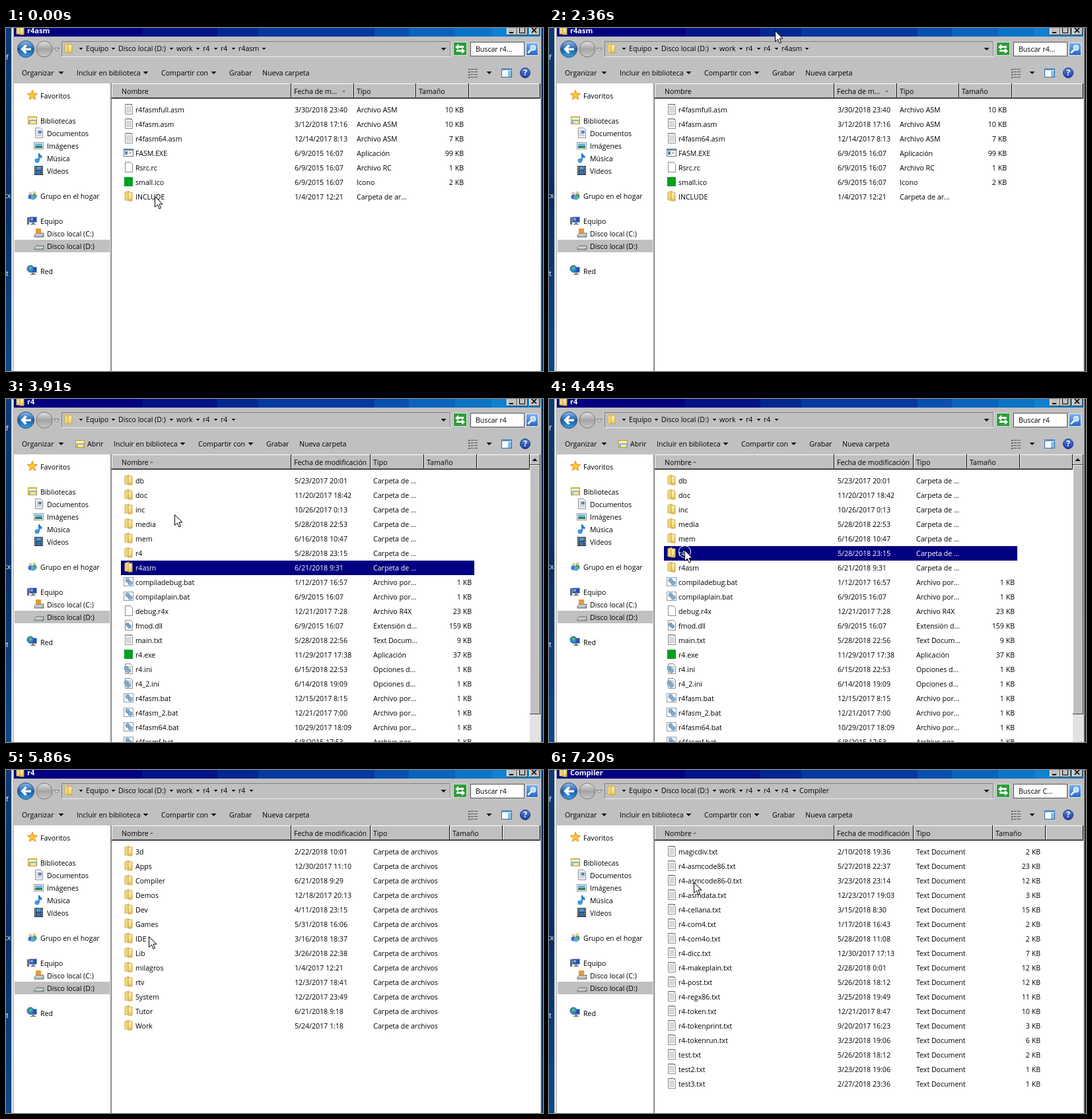
These frames come from a looping animation (813x520 px, 8000 ms). An HTML page with a canvas:

```html
<!DOCTYPE html>
<html lang="es">
<head>
<meta charset="utf-8">
<style>
html, body { margin: 0; width: 100%; height: 100%; overflow: hidden; background: #c0c0c0; }
canvas { display: block; }
</style>
</head>
<body>
<canvas id="stage" width="813" height="520"></canvas>
<script>
const g = document.getElementById('stage').getContext('2d');
const LOOP = 8000;
const FONT = '10.6px "Open Sans", "Noto Sans", sans-serif';
const GRAY = '#c0c0c0', NAVY = '#000080';

// ---- drawing helpers ----
function box(x, y, w, h, color) { g.fillStyle = color; g.fillRect(x, y, w, h); }
function frame(x, y, w, h, color) { g.strokeStyle = color; g.lineWidth = 1; g.strokeRect(x + .5, y + .5, w - 1, h - 1); }
function bevel(x, y, w, h, light = '#fff', dark = '#404040') {
  box(x, y, w, 1, light); box(x, y, 1, h, light);
  box(x, y + h - 1, w, 1, dark); box(x + w - 1, y, 1, h, dark);
}
function text(s, x, y, color = '#000', align = 'left', font = FONT) {
  g.font = font; g.textAlign = align; g.fillStyle = color; g.fillText(s, x, y + 4);
}
function poly(points, fill, stroke) {
  g.beginPath();
  points.forEach(([x, y]) => g.lineTo(x, y));
  g.closePath();
  if (fill) { g.fillStyle = fill; g.fill(); }
  if (stroke) { g.strokeStyle = stroke; g.lineWidth = 1; g.stroke(); }
}
function disc(x, y, r, fill, stroke) {
  g.beginPath(); g.arc(x, y, r, 0, 7);
  if (fill) { g.fillStyle = fill; g.fill(); }
  if (stroke) { g.strokeStyle = stroke; g.lineWidth = 1; g.stroke(); }
}
function arrowDown(x, y, rows, color = '#000') {
  for (let i = 0; i < rows; i++) box(x - rows + 1 + i, y - 1 + i, 2 * (rows - i) - 1, 1, color);
}
function arrowUp(x, y, rows, color) {
  for (let i = 0; i < rows; i++) box(x - i, y - 1 + i, 2 * i + 1, 1, color);
}
function fade(y0, y1, ...colors) {
  const f = g.createLinearGradient(0, y0, 0, y1);
  colors.forEach((c, i) => f.addColorStop(i / (colors.length - 1), c));
  return f;
}

// ---- 16 px icons, origin at the top left ----
function page(lines) {
  poly([[2.5, .5], [10.5, .5], [13.5, 3.5], [13.5, 15.5], [2.5, 15.5]], '#fff', '#8a8a8a');
  if (lines) for (let y = 4; y < 14; y += 2) box(4, y, 8, 1, '#a9b4bc');
}
function gear(x, y, r) {
  disc(x, y, r, '#a8cde8', '#4f7fa8');
  disc(x, y, 1, '#fff', '#4f7fa8');
}
function monitor() {
  box(3, 2, 12, 9, '#9aa4b4'); box(4, 3, 10, 7, '#2450b0'); box(5, 4, 4, 4, '#6ea0ea');
  box(7, 11, 4, 2, '#888'); box(5, 13, 8, 1, '#666');
}
function drive() {
  poly([[1, 11], [4, 8], [15, 8], [15, 14], [1, 14]], '#b4b8bc', '#70757a');
  box(2, 10, 12, 1, '#e8e8e8'); box(12, 12, 2, 1, '#20c040');
}
function people(x, y, color) { disc(x, y, 2.6, '#e8c49a'); disc(x, y + 5, 3.5, color); }
const ICONS = {
  folder() {
    poly([[2, 2], [8, 0], [8, 14], [2, 14]], '#f0d678', '#d0b050');
    poly([[7, 2], [13, 2], [13, 15], [7, 15]], fade(2, 15, '#fbeeb0', '#e4bd48'), '#cfa848');
    box(9, 3, 1, 9, '#fff6d0');
  },
  library() {
    box(1, 2, 13, 12, '#e9c85a'); box(2, 4, 13, 4, '#fff2b8');
    box(3, 7, 12, 7, '#7fb8dc'); box(5, 9, 8, 5, '#f4e6a0'); frame(1, 2, 14, 12, '#c09a38');
  },
  page() { page(false); },
  text() { page(true); for (let x = 4; x < 13; x += 2) box(x, 0, 1, 2, '#777'); },
  doc() { page(true); box(7, 5, 5, 4, '#4c88cc'); },
  bat() { box(0, 2, 15, 13, '#fff'); frame(0, 1, 15, 14, '#8a9aa8'); gear(6, 6, 3); gear(10, 10, 3); },
  ini() { page(true); gear(4, 7, 3); gear(7, 11, 3); },
  dll() { page(false); gear(6, 7, 2.5); gear(9, 10, 2.5); },
  exe() { box(0, 2, 15, 12, '#fff'); frame(0, 2, 15, 12, '#66747e'); box(1, 3, 13, 2, '#7890a8'); box(2, 6, 4, 5, '#4888a0'); box(8, 7, 4, 1, '#999'); box(8, 9, 4, 1, '#999'); },
  square() { box(1, 1, 13, 14, '#00a020'); },
  star() {
    poly(Array.from({ length: 10 }, (_, i) => {
      const a = i * Math.PI / 5, r = i % 2 ? 3.4 : 8;
      return [8 + r * Math.sin(a), 8 - r * Math.cos(a)];
    }), '#ffc832', '#e08820');
  },
  image() { box(0, 3, 15, 11, '#fff'); frame(0, 3, 15, 11, '#909090'); box(2, 5, 11, 4, '#68b8e8'); box(2, 9, 11, 3, '#2e7a50'); },
  music() { box(7, 1, 2, 11, '#2878c8'); poly([[8, 1], [13, 6], [11, 9], [8, 5]], '#2878c8'); disc(5, 12, 3.5, '#3c98e0'); },
  film() { box(1, 1, 13, 14, '#303438'); box(4, 2, 7, 5, '#4898d8'); box(4, 8, 7, 6, '#3070b0'); for (let y = 2; y < 14; y += 3) { box(2, y, 1, 2, '#ddd'); box(12, y, 1, 2, '#ddd'); } },
  group() { people(11, 4, '#38a048'); people(5, 5, '#3470c8'); disc(9, 11, 3.5, '#58a8d8'); },
  computer() { monitor(); box(0, 3, 3, 11, '#606878'); },
  driveC() { drive(); box(3, 1, 8, 7, '#e89830'); },
  drive,
  network() { monitor(); disc(5, 5, 5, '#3088d0', '#2060a0'); box(3, 2, 4, 4, '#58c060'); }
};
function icon(name, x, y) { g.save(); g.translate(x, y - 8); ICONS[name](); g.restore(); }

// ---- folder contents: name, date, time, size in KB ----
const TYPES = { asm: 'Archivo ASM', bat: 'Archivo por...', r4x: 'Archivo R4X', dll: 'Extensión d...', exe: 'Aplicación', ini: 'Opciones d...', rc: 'Archivo RC', ico: 'Icono' };
const FILE_ICONS = { asm: 'text', txt: 'text', bat: 'bat', dll: 'dll', exe: 'exe', ini: 'ini', rc: 'page', r4x: 'page', ico: 'square' };
const parse = s => s.trim().split('\n').map(line => line.trim().split(' '));
const CRUMBS = ['Equipo', 'Disco local (D:)', 'work', 'r4', 'r4'];
const CRUMB_X = [121, 170, 258, 298, 325, 352, 379];

const asmView = {
  title: 'r4asm', search: 'Buscar r4...', crumbs: [...CRUMBS, 'r4asm'], tail: 390,
  cols: [431, 526, 620, 700], typeX: 531, sizeX: 693, dateHead: 'Fecha de m...', byDate: true,
  folder: 'Carpeta de ar...',
  rows: parse(`r4fasmfull.asm 3/30/2018 23:40 10
    r4fasm.asm 3/12/2018 17:16 10
    r4fasm64.asm 12/14/2017 8:13 7
    FASM.EXE 6/9/2015 16:07 99
    Rsrc.rc 6/9/2015 16:07 1
    small.ico 6/9/2015 16:07 2
    INCLUDE 1/4/2017 12:21`)
};
const rootView = {
  title: 'r4', search: 'Buscar r4', crumbs: CRUMBS, tail: 344,
  cols: [431, 551, 632, 712], typeX: 556, sizeX: 705, scroll: true,
  folder: 'Carpeta de ...', txt: 'Text Docum...',
  rows: parse(`db 5/23/2017 20:01
    doc 11/20/2017 18:42
    inc 10/26/2017 0:13
    media 5/28/2018 22:53
    mem 6/16/2018 10:47
    r4 5/28/2018 23:15
    r4asm 6/21/2018 9:31
    compiladebug.bat 1/12/2017 16:57 1
    compilaplain.bat 6/9/2015 16:07 1
    debug.r4x 12/21/2017 7:28 23
    fmod.dll 6/9/2015 16:07 159
    main.txt 5/28/2018 22:56 9
    r4.exe 11/29/2017 17:38 37
    r4.ini 6/15/2018 22:53 1
    r4_2.ini 6/14/2018 19:09 1
    r4fasm.bat 12/15/2017 8:15 1
    r4fasm_2.bat 12/21/2017 7:00 1
    r4fasm64.bat 10/29/2017 18:09 1
    r4fasmf.bat 6/8/2015 17:53 1`)
};
const codeView = {
  title: 'r4', search: 'Buscar r4', crumbs: [...CRUMBS, 'r4'], tail: 371,
  cols: [431, 551, 671, 751], typeX: 556, sizeX: 744, folder: 'Carpeta de archivos',
  rows: parse(`3d 2/22/2018 10:01
    Apps 12/30/2017 11:10
    Compiler 6/21/2018 9:29
    Demos 12/18/2017 20:13
    Dev 4/11/2018 23:15
    Games 5/31/2018 16:06
    IDE 3/16/2018 18:37
    Lib 3/26/2018 22:38
    milagros 1/4/2017 12:21
    rtv 12/3/2017 18:41
    System 12/2/2017 23:49
    Tutor 6/21/2018 9:18
    Work 5/24/2017 1:18`)
};
const compilerView = {
  ...codeView, title: 'Compiler', search: 'Buscar C...', crumbs: [...CRUMBS, 'r4', 'Compiler'], tail: 0,
  txt: 'Text Document',
  rows: parse(`magicdiv.txt 2/10/2018 19:36 2
    r4-asmcode86.txt 5/27/2018 22:37 23
    r4-asmcode86-0.txt 3/23/2018 23:14 12
    r4-asmdata.txt 12/23/2017 19:03 3
    r4-cellana.txt 3/15/2018 8:30 15
    r4-com4.txt 1/17/2018 16:43 2
    r4-com4o.txt 5/28/2018 11:08 2
    r4-dicc.txt 12/30/2017 17:13 7
    r4-makeplain.txt 2/28/2018 0:01 12
    r4-post.txt 5/26/2018 18:12 12
    r4-regx86.txt 3/25/2018 19:49 11
    r4-token.txt 12/21/2017 8:47 10
    r4-tokenprint.txt 9/20/2017 16:23 3
    r4-tokenrun.txt 3/23/2018 19:06 6
    test.txt 5/26/2018 18:12 2
    test2.txt 3/23/2018 19:06 1
    test3.txt 2/27/2018 23:36 1`)
};

// ---- parts of the window ----
function windowFrame(view) {
  box(0, 0, 813, 520, fade(0, 520, '#0b3c78', '#073068', '#0a4a8c'));
  text('f', 0, 44, '#fff'); text('tx', -2, 254, '#fff'); text('t', 0, 372, '#fff');
  box(8, 0, 803, 520, GRAY); box(9, 0, 1, 520, '#fff'); box(810, 0, 1, 520, '#808080'); box(811, 0, 1, 520, '#101018');
  [[12, NAVY], [206, '#001488'], [320, '#002890'], [382, '#0539a0'], [558, '#0850b0'], [610, '#0a64bc'], [680, '#0c74c6'], [735, '#1080d0']]
    .forEach(([x, color]) => box(x, 0, 809 - x, 13, color));
  icon('folder', 14, 3);
  text(view.title, 32, 4, '#fff', 'left', 'bold 11px "Open Sans", "Noto Sans", sans-serif');
  [758, 774, 792].forEach(x => { box(x, -4, 16, 15, GRAY); bevel(x, -4, 16, 15); });
  box(762, 6, 6, 2, '#000'); frame(777, -1, 9, 9, '#000');
  g.strokeStyle = '#000'; g.lineWidth = 1.6;
  g.beginPath(); g.moveTo(796, 0); g.lineTo(803, 7); g.moveTo(803, 0); g.lineTo(796, 7); g.stroke();
}

function addressBar(view, tail, hover) {
  disc(58, 32, 12, fade(20, 44, '#e4e4e4', '#a4a4a4', '#c8c8c8'), '#777');
  disc(30, 32, 12.5, fade(20, 45, '#8ab8e8', '#1c5ca8', '#38a8e8'), '#234a78');
  poly([[22, 32], [29, 25], [32, 27], [29, 30.5], [38, 30.5], [38, 34], [29, 34], [32, 37], [29, 39]], '#fff');
  poly([[72.5, 30.5], [80.5, 30.5], [76.5, 35]], '#ddd', '#777');
  frame(84, 20, 589, 24, '#808080'); box(84, 43, 590, 1, '#eee');
  box(673, 20, 1, 24, '#eee');
  icon('folder', 87, 31);
  view.crumbs.forEach((name, i) => {
    arrowDown(CRUMB_X[i] - 8, 31, 3);
    text(name, CRUMB_X[i], 31);
  });
  if (tail && view.tail) arrowDown(view.tail, 31, 3);
  if (hover) bevel(324, 22, 28, 20, ...(hover === 'down' ? ['#606060', '#fff'] : ['#fff', '#606060']));
  arrowDown(662, 31, 4);
  box(677, 21, 21, 21, '#2f9c3c'); frame(677, 21, 21, 21, '#d8e8d8');
  poly([[680, 29], [685, 24], [685, 27], [693, 27], [693, 30], [685, 30], [685, 33]], '#fff');
  poly([[695, 35], [690, 30], [690, 33], [682, 33], [682, 36], [690, 36], [690, 39]], '#fff');
  box(704, 22, 81, 20, '#fff'); frame(703, 21, 82, 22, '#555');
  text(view.search, 711, 32);
  box(787, 22, 19, 20, fade(22, 42, '#7eb4ee', '#2462c0')); frame(787, 22, 19, 20, '#e0e8f0');
  disc(798, 30, 4, '#b8dcff', '#fff');
  g.lineWidth = 2.5; g.strokeStyle = '#fff'; g.beginPath(); g.moveTo(795, 33); g.lineTo(790, 38); g.stroke();
}

function toolbar(withOpen) {
  const dx = withOpen ? 56 : 0;
  text('Organizar', 24, 68); arrowDown(83, 67, 4);
  if (withOpen) { icon('library', 104, 68); text('Abrir', 123, 68); }
  text('Incluir en biblioteca', 107 + dx, 68); arrowDown(211 + dx, 67, 4);
  text('Compartir con', 235 + dx, 68); arrowDown(314 + dx, 67, 4);
  text('Grabar', 338 + dx, 68); text('Nueva carpeta', 388 + dx, 68);
  for (let y = 62; y < 75; y += 4) {
    box(700, y, 2, 2, '#555');
    box(703, y, 5, 1, '#555'); box(709, y, 5, 1, '#555');
  }
  arrowDown(731, 67, 4);
  box(750, 62, 16, 13, '#fff'); frame(750, 61, 16, 14, '#3068a0'); box(750, 61, 16, 3, '#5090c8'); box(760, 65, 5, 9, '#80c0e8');
  disc(786, 68, 7.5, fade(60, 76, '#5888d8', '#1838a0'), '#183080');
  text('?', 786, 68, '#fff', 'center', 'bold 12px "Open Sans", sans-serif');
}

const PLACES = [
  ['star', 'Favoritos', 103], ['library', 'Bibliotecas', 141], ['doc', 'Documentos', 160, 1], ['image', 'Imágenes', 179, 1],
  ['music', 'Música', 198, 1], ['film', 'Vídeos', 217, 1], ['group', 'Grupo en el hogar', 255], ['computer', 'Equipo', 293],
  ['driveC', 'Disco local (C:)', 312, 1], ['drive', 'Disco local (D:)', 331, 1], ['network', 'Red', 369]
];
function sidebar() {
  box(12, 84, 145, 436, '#fff');
  box(13, 321, 144, 19, GRAY);
  box(157, 84, 1, 436, '#d8d8d8'); box(159, 84, 1, 436, '#707070');
  PLACES.forEach(([name, label, y, nested = 0]) => {
    icon(name, 32 + nested * 10, y - 1);
    text(label, 52 + nested * 10, y);
  });
}

function fileList(view, selected) {
  box(160, 84, 649, 436, '#fff');
  const right = view.scroll ? 793 : 809;
  const edges = [160, ...view.cols.map(x => x + 1), right];
  box(160, 84, right - 160, 23, GRAY);
  edges.slice(1).forEach((x, i) => bevel(edges[i], 84, x - edges[i], 23, '#fff', '#000'));
  box(160, 105, right - 160, 1, '#808080');
  const heads = ['Nombre', view.dateHead || 'Fecha de modificación', 'Tipo', 'Tamaño'];
  heads.forEach((s, i) => text(s, i ? view.cols[i - 1] + 5 : 175, 96));
  if (view.byDate) arrowDown(511, 96, 3, '#808080'); else arrowUp(220, 95, 3, '#808080');

  view.rows.forEach(([name, date, time, size], i) => {
    const y = 124 + 22 * i, active = i === selected, color = active ? '#fff' : '#000';
    const ext = (name.split('.')[1] || '').toLowerCase();
    if (active) box(174, y - 11, view.cols[3] - 177, 22, NAVY);
    icon(name === 'r4.exe' ? 'square' : FILE_ICONS[ext] || 'folder', 178, y - 1);
    text(name, 196, y, color);
    text(date + ' ' + time, 437, y, color);
    text(!ext ? view.folder : ext === 'txt' ? view.txt : TYPES[ext], view.typeX, y, color);
    if (size) text(size + ' KB', view.sizeX, y, color, 'right');
  });

  if (view.scroll) {
    box(793, 84, 16, 436, '#e2e2e2');
    [[84, 16], [100, 378]].forEach(([y, h]) => { box(793, y, 16, h, GRAY); bevel(793, y, 16, h); });
    arrowUp(800, 91, 4, '#000');
  }
}

function pointer(x, y) {
  const shape = [[0, 0], [0, 16], [4, 12.5], [6.5, 18.5], [9, 17.5], [6.5, 11.5], [11.5, 11.5]];
  poly(shape.map(([px, py]) => [x + px + .5, y + py + .5]), '#fff', '#000');
}

// ---- timeline ----
// Pointer stops: time, x, y.
const PATH = [
  [0, 225, 255], [400, 229, 243], [520, 235, 215], [645, 238, 180], [770, 236, 155], [890, 234, 142], [1320, 234, 143],
  [2090, 327, 13], [2240, 345, 0], [2360, 342, 4], [2520, 334, 33], [2670, 333, 35], [3090, 332, 33], [3220, 335, 30],
  [3360, 275, 128], [3670, 272, 140], [3790, 255, 175], [3915, 232, 208], [4040, 212, 224], [4160, 204, 230], [4310, 205, 229],
  [5170, 212, 211], [5320, 213, 202], [5440, 214, 197], [5590, 216, 212], [5720, 215, 230], [5860, 216, 252], [5985, 212, 274],
  [6110, 209, 285], [6390, 209, 286], [6530, 216, 220], [6660, 218, 168], [6930, 219, 170]
];
const VIEWS = [[0, asmView], [3090, rootView], [4740, codeView], [7080, compilerView]];
const CLICKS = [[2820, 2950, 333, 34, '#000'], [4310, 4740, 205, 231, '#fff'], [6810, 7080, 220, 171, '#fff']];
const latest = (list, t) => list.filter(entry => entry[0] <= t).pop();
const within = (t, a, b) => t >= a && t < b;

function draw(t) {
  const view = latest(VIEWS, t)[1];
  const selected = view === rootView ? (t < 4310 ? 6 : 5) : view === codeView && t >= 6810 ? 2 : -1;
  const tail = !within(t, 3090, 3220) && !within(t, 4740, 5020);
  const hover = within(t, 2820, 2950) ? 'down' : within(t, 2520, 3090) ? 'over' : '';
  windowFrame(view);
  addressBar(view, tail, hover);
  toolbar(within(t, 3220, 4740));
  sidebar();
  fileList(view, selected);
  CLICKS.forEach(([from, to, x, y, color]) => { if (within(t, from, to)) disc(x + .5, y + .5, 9, null, color); });
  const [, x, y] = latest(PATH, t);
  pointer(x, y);
}

function tick() {
  draw(performance.now() % LOOP);
  requestAnimationFrame(tick);
}
tick();
</script>
</body>
</html>
```
